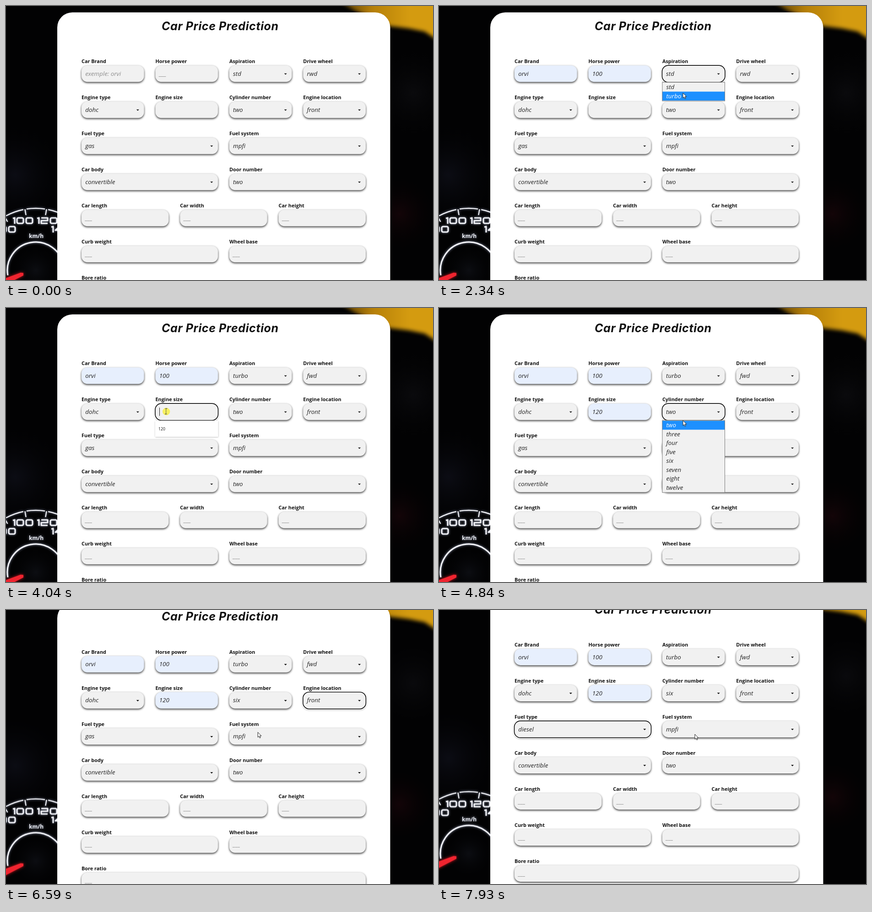
Write an HTML page with a canvas that moves like this. It is 933 px wide and 600 px high and loops after 8 s.

```html
<!DOCTYPE html>
<html lang="en">
<head>
<meta charset="utf-8">
<title>Car Price Prediction</title>
<style>
html, body { margin: 0; width: 100%; height: 100%; overflow: hidden; background: #020203; }
canvas { display: block; }
</style>
</head>
<body>
<canvas id="stage" width="933" height="600"></canvas>
<script>
const W = 933, LOOP = 8000, SCROLL = 45.3, BRAND = 'orvi';
const ROW_H = 19.5, MOVE = 280, REFRESH = 100;
const ctx = document.getElementById('stage').getContext('2d');
const SANS = '"Open Sans", "Noto Sans", sans-serif';
const VALUE = 'italic 13.44px ' + SANS;

const clamp01 = v => Math.max(0, Math.min(1, v));
const ease = v => v * v * (3 - 2 * v);
const mix = (a, b, k) => a + (b - a) * k;
const scrollAt = t => SCROLL * ease(clamp01((t - 6290) / 400));

// Each row shares the form width equally; a third word group lists select options
const LEFT = 165, FULL = 621, GAP = 24.8;
const rows = [
  ['Car Brand|exemple: ' + BRAND, 'Horse power|___', 'Aspiration|std|std turbo', 'Drive wheel|rwd|rwd fwd 4wd'],
  ['Engine type|dohc|dohc ohcv ohc rotor l ohcf', 'Engine size|',
    'Cylinder number|two|two three four five six seven eight twelve', 'Engine location|front|front rear'],
  ['Fuel type|gas|gas diesel', 'Fuel system|mpfi|mpfi'],
  ['Car body|convertible|convertible', 'Door number|two|two'],
  ['Car length|___', 'Car width|___', 'Car height|___'],
  ['Curb weight|___', 'Wheel base|___'],
  ['Bore ratio|___']
];
const fields = rows.flatMap((row, r) => row.map((text, i) => {
  const [label, value, list] = text.split('|');
  const w = (FULL - GAP * (row.length - 1)) / row.length;
  return { label, value, options: list && list.split(' '), x: LEFT + i * (w + GAP), y: 130.2 + r * 79, w, h: 36 };
}));
const inside = (f, p) => p.x > f.x && p.x < f.x + f.w && p.y > f.y && p.y < f.y + f.h;
const menuTop = f => f.y + f.h + .8;

// Field visits: focus time, pick time, picked value, press point across the width
const visit = (label, focus, close, pick, at = .33) =>
  ({ field: fields.find(f => f.label === label), focus, close, pick, at });
const visits = [
  visit('Car Brand', 800, 1320, BRAND, .46),
  visit('Horse power', 1550, 1850, '100'),
  visit('Aspiration', 2130, 2440, 'turbo'),
  visit('Drive wheel', 2840, 3180, 'fwd'),
  visit('Engine type', 3480, 3750, 'dohc'),
  visit('Engine size', 3940, 4440, '120', .17),
  visit('Cylinder number', 4640, 5140, 'six'),
  visit('Engine location', 5790, 6090, 'front'),
  visit('Fuel type', 7180, 7730, 'diesel')
];

// Pointer rests: on the field, then on the chosen entry
const stops = visits.flatMap(({ field: f, focus, close, pick, at }) => {
  const x = f.x + f.w * at, up = scrollAt(focus);
  const entry = f.options ? 1 + (f.options.indexOf(pick) + .15) * ROW_H : 18;
  return [
    { t: focus - 50, hold: focus + 50, x, y: f.y + 17 - up },
    { t: close - 110, hold: close, x, y: menuTop(f) + entry - up }
  ];
});
const rest = (t, x, y) => ({ t, hold: t, x, y });
stops.push(rest(130, 600, 462), rest(6690, 328, 295), rest(7930, 559, 272));
stops.sort((a, b) => a.t - b.t);

function pointerAt(t) {
  const i = Math.max(0, stops.findLastIndex(s => t >= s.t));
  const a = stops[i], b = stops[i + 1];
  if (!b) return a;
  const start = Math.max(a.hold, b.t - MOVE);
  const k = ease(clamp01((t - start) / (b.t - start)));
  return { x: mix(a.x, b.x, k), y: mix(a.y, b.y, k) };
}

const pressed = t => visits.some(v => (t >= v.focus && t < v.focus + 130) || (t >= v.close - 80 && t < v.close + 50));

function write(c, str, x, y, font, color) {
  c.font = font;
  c.fillStyle = color;
  c.fillText(str, x, y);
}

function box(c, x, y, w, h, r) {
  c.beginPath();
  c.roundRect(x, y, w, h, r);
}

function lines(c, ...pts) {
  c.beginPath();
  pts.forEach(([x, y], i) => i ? c.lineTo(x, y) : c.moveTo(x, y));
}

function setShadow(c, color, blur, dy = 0) {
  c.shadowColor = color;
  c.shadowBlur = blur;
  c.shadowOffsetY = dy;
}

function glow(c, x, y, r, color) {
  const g = c.createRadialGradient(x, y, 0, x, y, r);
  g.addColorStop(0, color);
  g.addColorStop(1, 'rgba(0,0,0,0)');
  c.fillStyle = g;
  c.fillRect(x - r, y - r, 2 * r, 2 * r);
}

// Wide dial numerals; returns the advance
function numeral(c, d, x, y) {
  const w = 14, h = 12, mid = y + h / 2, end = y + h;
  if (d === '0' || d === '8') box(c, x, y, w, h, 3);
  if (d === '8') { c.moveTo(x, mid); c.lineTo(x + w, mid); }
  if (d === '1') lines(c, [x, y + 1], [x + 4, y], [x + 4, end + 1]);
  if (d === '2') lines(c, [x, y], [x + w, y], [x + w, mid], [x, mid], [x, end], [x + w, end]);
  if (d === '4') lines(c, [x + 9, end], [x + 9, y], [x, y + 8], [x + w, y + 8]);
  c.stroke();
  return d === '1' ? 9 : 20;
}

function dial(c, str, x, y) {
  for (const d of str) x += numeral(c, d, x, y);
}

function gauge(c) {
  const cx = 65, cy = 579, R = 136;
  const rad = deg => (deg - 90) * Math.PI / 180;
  const polar = (r, deg) => [cx + r * Math.cos(rad(deg)), cy + r * Math.sin(rad(deg))];
  const arc = (r, a, b) => {
    c.beginPath();
    c.arc(cx, cy, r, rad(a), rad(b));
    c.stroke();
  };
  glow(c, cx, cy, 60, 'rgba(24,27,36,.45)');
  c.save();
  setShadow(c, 'rgba(190,200,230,.7)', 5);
  c.strokeStyle = '#f0f1f6';
  c.lineJoin = 'round';
  c.lineWidth = 2.4;
  for (let a = -50; a <= 50; a += 20) {
    arc(R, a + 1.5, a + 18.5);
    lines(c, polar(R, a), polar(R - 13, a));
    c.stroke();
  }
  c.lineWidth = 3.2;
  arc(62, -100, 100);
  dial(c, '100', 15, 464);
  dial(c, '120', 68, 464);
  dial(c, '80', -14, 483);
  dial(c, '14', 99, 483);
  write(c, 'km/h', 50, 508, 'bold 12px ' + SANS, '#eef0f6');
  setShadow(c, '#d0141e', 6);
  c.fillStyle = '#f0242f';
  lines(c, [-6, 598], [32, 584], [38, 584.5], [38, 590], [-6, 613]);
  c.fill();
  c.restore();
}

// Blurred dashboard behind the card
function makeBackdrop() {
  const cv = document.createElement('canvas');
  cv.width = W;
  cv.height = 660;
  const c = cv.getContext('2d');
  c.fillStyle = '#020203';
  c.fillRect(0, 0, W, 660);
  glow(c, 20, 370, 130, 'rgba(14,15,24,.8)');
  glow(c, 860, 455, 90, 'rgba(26,6,10,.7)');
  glow(c, 890, 190, 120, 'rgba(12,12,15,.8)');
  c.filter = 'blur(4px)';
  const gold = c.createLinearGradient(720, 0, 880, 0);
  gold.addColorStop(0, '#4a3305');
  gold.addColorStop(.5, '#b57f08');
  gold.addColorStop(1, '#d49b10');
  c.fillStyle = gold;
  lines(c, [730, -10], [945, -10], [945, 76], [915, 56], [880, 49], [838, 44], [800, 26], [760, 9]);
  c.fill();
  c.filter = 'none';
  gauge(c);
  return cv;
}
const backdrop = makeBackdrop();

function drawField(f, value, filled, focused, preview) {
  ctx.save();
  setShadow(ctx, 'rgba(0,0,0,.78)', 4, 2);
  ctx.fillStyle = filled ? '#e7effd' : '#f1f1f1';
  box(ctx, f.x, f.y, f.w, f.h, 13);
  ctx.fill();
  ctx.restore();
  if (focused) {
    for (const [color, width] of [['#fff', 4.6], ['#101010', 1.7]]) {
      ctx.strokeStyle = color;
      ctx.lineWidth = width;
      box(ctx, f.x - .4, f.y - .1, f.w + .8, f.h + .9, 13.5);
      ctx.stroke();
    }
  }
  write(ctx, f.label, f.x, f.y - 5, 'bold 10.9px ' + SANS, '#111');
  if (preview) write(ctx, preview, f.x + 8, f.y + 22.8, '9px ' + SANS, '#111');
  else write(ctx, value, f.x + 8.2, f.y + 22.6, VALUE, f.options || filled ? '#252525' : '#8f8f8f');
  if (f.options) {
    const ax = f.x + f.w - 13.8, ay = f.y + 17.2;
    ctx.fillStyle = '#111';
    lines(ctx, [ax - 3, ay], [ax + 3, ay], [ax, ay + 3.2]);
    ctx.fill();
  } else if (focused && !filled) {
    ctx.fillStyle = '#222';
    ctx.fillRect(Math.floor(f.x + 9), f.y + 9, 1, 18);
  }
}

function drawOptions(f, value, p) {
  const top = menuTop(f), h = f.options.length * ROW_H + 2;
  const hover = Math.floor((p.y - top - 1) / ROW_H);
  const hot = f.options[hover] ? hover : f.options.indexOf(value);
  ctx.fillStyle = '#f1f1f1';
  ctx.fillRect(f.x, top, f.w, h);
  f.options.forEach((name, i) => {
    const y = top + 1 + i * ROW_H;
    if (i === hot) {
      ctx.fillStyle = '#1e90ff';
      ctx.fillRect(f.x, y, f.w, ROW_H);
    }
    write(ctx, name, f.x + 8.6, y + 14.4, VALUE, i === hot ? '#fff' : '#252525');
  });
  ctx.strokeStyle = '#777';
  ctx.lineWidth = 1;
  ctx.strokeRect(f.x, top, f.w, h);
}

function drawSuggestion(f, text, hot) {
  const top = menuTop(f) + .7, x = f.x - .5, w = f.w + 1;
  ctx.save();
  setShadow(ctx, 'rgba(0,0,0,.4)', 3, 1);
  ctx.fillStyle = '#fff';
  ctx.fillRect(x, top, w, 35.5);
  ctx.restore();
  if (hot) {
    ctx.fillStyle = '#e8e8e8';
    ctx.fillRect(x, top + 5.3, w, 25);
  }
  write(ctx, text, f.x + 6.5, top + 21, '8.7px ' + SANS, '#111');
}

function drawPointer({ x, y }, beam, clicking) {
  if (clicking) {
    ctx.fillStyle = 'rgba(248,240,60,.8)';
    ctx.beginPath();
    ctx.arc(x + .5, y + .5, 8.2, 0, 7);
    ctx.fill();
  }
  ctx.lineWidth = beam ? .8 : 1;
  ctx.strokeStyle = beam ? '#444' : '#222';
  if (beam) {
    lines(ctx, [x - 2.5, y - 6], [x + 2.5, y - 6], [x, y - 6], [x, y + 6], [x - 2.5, y + 6], [x + 2.5, y + 6]);
  } else {
    lines(ctx, [x, y], [x, y + 11], [x + 2.5, y + 8.8], [x + 4.2, y + 12.6], [x + 6, y + 11.8], [x + 4.4, y + 8.1], [x + 7.8, y + 8]);
    ctx.closePath();
    ctx.fillStyle = '#fff';
    ctx.fill();
  }
  ctx.stroke();
}

function draw(t) {
  const shown = Math.floor((t - 30) / REFRESH) * REFRESH + 30;
  const scroll = scrollAt(shown);
  const p = pointerAt(shown);
  const local = { x: p.x, y: p.y + scroll };
  const active = visits.findLast(v => t >= v.focus);
  const open = active && t < active.close ? active : null;
  const hovering = open && local.y > menuTop(open.field);
  const valueOf = f => {
    const done = visits.find(v => v.field === f && t >= v.close);
    return done ? done.pick : f.value;
  };

  ctx.save();
  ctx.translate(0, -scroll);
  ctx.drawImage(backdrop, 0, 0);
  ctx.fillStyle = '#fff';
  box(ctx, 112, 14, 727.5, 900, 33);
  ctx.fill();
  ctx.letterSpacing = '0.6px';
  write(ctx, 'Car Price Prediction', 340, 52.8, 'italic 700 25px Inter, "Open Sans", sans-serif', '#111');
  ctx.letterSpacing = '0px';

  for (const f of fields) {
    const value = valueOf(f);
    const preview = hovering && open.field === f && !f.options ? open.pick : '';
    const filled = !f.options && (value !== f.value || preview !== '');
    drawField(f, value, filled, Boolean(active && active.field === f), preview);
  }
  if (open && open.field.options) drawOptions(open.field, valueOf(open.field), local);
  else if (open) drawSuggestion(open.field, open.pick, hovering);
  ctx.restore();

  const beam = !hovering && fields.some(f => !f.options && inside(f, local));
  if (t >= 130) drawPointer(p, beam, pressed(t));
}

function tick() {
  draw(performance.now() % LOOP);
  requestAnimationFrame(tick);
}
tick();
</script>
</body>
</html>
```
